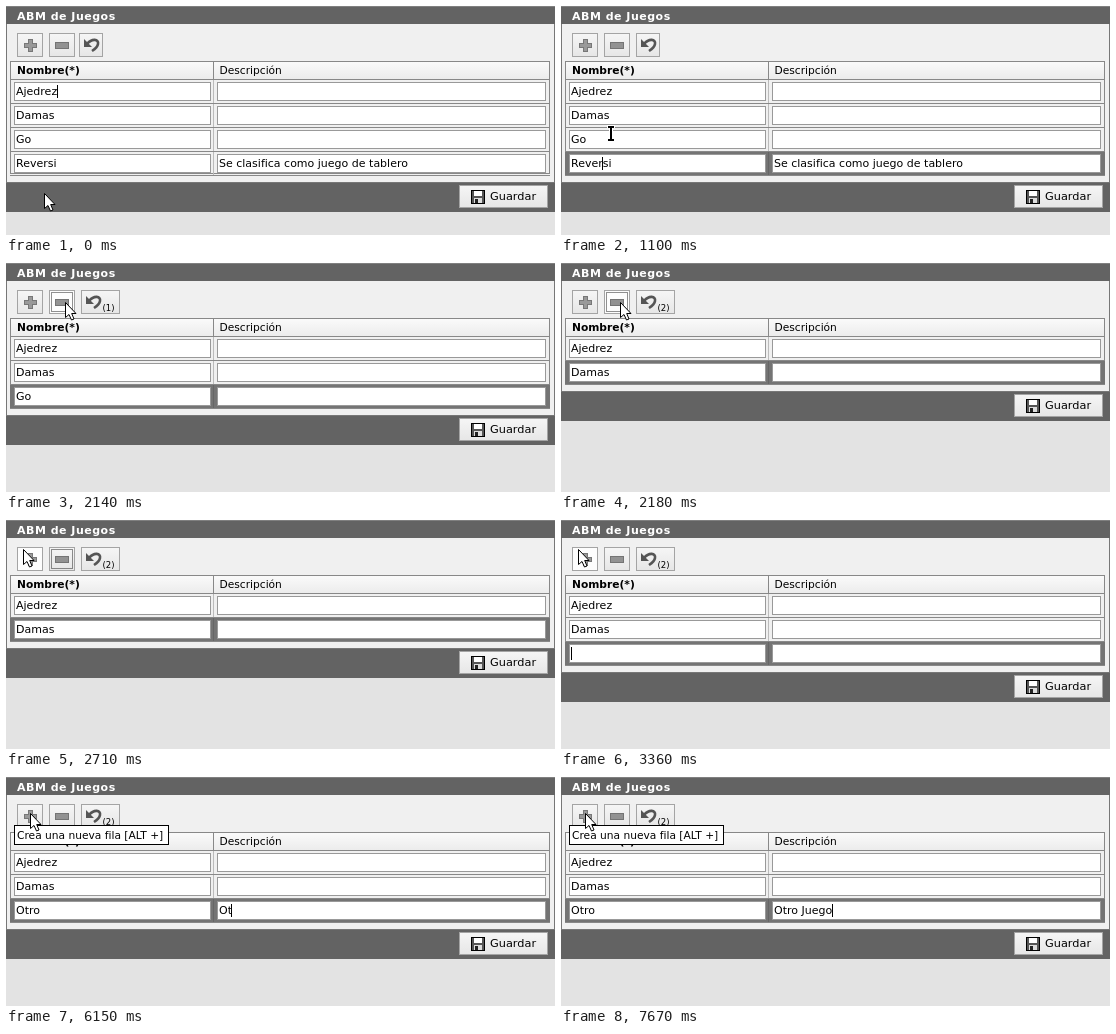
Write an HTML page with a canvas that moves like this. It is 549 by 229 pixels and loops after 8000 ms.

```html
<!DOCTYPE html>
<html lang="es">
<head>
<meta charset="utf-8">
<title>ABM de Juegos</title>
<style>
html, body { margin: 0; width: 100%; height: 100%; overflow: hidden; background: #e3e3e3; }
canvas { display: block; }
</style>
</head>
<body>
<canvas id="stage" width="549" height="229"></canvas>
<script>
const ctx = document.getElementById('stage').getContext('2d');
const LOOP = 8000;
const ROW = 24;
const FONT = '"DejaVu Sans", sans-serif';

const DELETE_1 = 1980, DELETE_2 = 2180, ADD_ROW = 3320, TOOLTIP = 3680, NEXT_FIELD = 5230;
const NAME_KEYS = [4200, 4600, 4680, 4850];
const TEXT_KEYS = [5750, 6100, 6190, 6280, 6720, 7200, 7420, 7500, 7590, 7670];

// Pointer path: time, x, y
const PATH = [
  [0, 39, 188], [50, 39, 188], [500, 43, 157], [900, 43, 157], [1100, 50, 127],
  [1540, 64, 41], [1700, 64, 41], [1740, 60, 40], [2590, 60, 40], [2710, 18, 30],
  [3520, 18, 30], [3680, 25, 37], [LOOP, 25, 37]
];

function pointerAt(t) {
  const i = PATH.findIndex(p => p[0] > t);
  const [t0, x0, y0] = PATH[i - 1], [t1, x1, y1] = PATH[i];
  const k = (t - t0) / (t1 - t0);
  return [Math.round(x0 + (x1 - x0) * k), Math.round(y0 + (y1 - y0) * k)];
}

const typed = (text, keys, t) => text.slice(0, keys.filter(k => k <= t).length);

function rect(x, y, w, h, color) {
  ctx.fillStyle = color;
  ctx.fillRect(x, y, w, h);
}

function box(x, y, w, h, fill, border) {
  rect(x, y, w, h, border);
  rect(x + 1, y + 1, w - 2, h - 2, fill);
}

function label(text, x, y, size = 11, color = '#000', weight = 'normal', spacing = 0) {
  ctx.font = `${weight} ${size}px ${FONT}`;
  ctx.letterSpacing = spacing + 'px';
  ctx.fillStyle = color;
  ctx.fillText(text, x, y);
}

function gradient(y, h, top, bottom) {
  const g = ctx.createLinearGradient(0, y, 0, y + h);
  g.addColorStop(0, top);
  g.addColorStop(1, bottom);
  return g;
}

function shape(points, x, y, fill, stroke) {
  ctx.beginPath();
  points.forEach(([px, py]) => ctx.lineTo(x + px, y + py));
  ctx.closePath();
  ctx.fillStyle = fill;
  ctx.fill();
  if (!stroke) return;
  ctx.strokeStyle = stroke;
  ctx.lineWidth = 1;
  ctx.stroke();
}

function button(x, y, w, h, hover) {
  box(x, y, w, h, hover ? '#fdfdfd' : gradient(y, h, '#f6f6f6', '#e6e6e6'), '#a4a4a4');
}

function field(x, y, w, text, caret) {
  box(x, y, w, 19, '#fff', '#999');
  label(text, x + 2, y + 13);
  if (caret === undefined) return;
  const cx = x + 2 + ctx.measureText(text.slice(0, caret)).width;
  rect(Math.floor(cx), y + 3, 1, 13, '#000');
}

function undoIcon(x, y) {
  ctx.strokeStyle = '#555';
  ctx.lineWidth = 2.6;
  ctx.beginPath();
  ctx.moveTo(x + 4, y + 6);
  ctx.bezierCurveTo(x + 9, y, x + 16, y + 1, x + 15, y + 6);
  ctx.bezierCurveTo(x + 14.5, y + 9, x + 12, y + 11, x + 9, y + 13);
  ctx.stroke();
  shape([[1, 1], [1, 9], [9, 9]], x, y, '#555');
}

function toolbar(t, px) {
  const overPlus = t >= 2710 && t < TOOLTIP;
  const overMinus = t >= 1500 && px > 43;
  button(11, 27, 26, 24, overPlus);
  rect(22, 33, 5, 13, '#777');
  rect(18, 37, 13, 5, '#777');
  rect(23, 34, 3, 11, '#999');
  rect(19, 38, 11, 3, '#999');

  button(43, 27, 26, 24, overMinus);
  box(49, 36, 14, 7, '#929292', '#747474');
  if (t >= 1940 && t < ADD_ROW) {
    ctx.strokeStyle = '#222';
    ctx.lineWidth = 1;
    ctx.setLineDash([1, 1]);
    ctx.strokeRect(45.5, 29.5, 21, 19);
    ctx.setLineDash([]);
  }

  const removed = t < DELETE_1 ? 0 : t < DELETE_2 ? 1 : 2;
  const x = t < 900 ? 73 : 75;
  button(x, 27, removed ? 39 : 24, 24);
  undoIcon(x + 4, 32);
  if (removed) label(`(${removed})`, 96.5, 48, 8.5);
}

function table(t) {
  const names = ['Ajedrez', 'Damas'];
  if (t < DELETE_2) names.push('Go');
  if (t < DELETE_1) names.push('Reversi');
  if (t >= ADD_ROW) names.push(typed('Otro', NAME_KEYS, t));
  const n = names.length;

  box(4, 55, 540, 17 + ROW * n, '#f0f0f0', '#888');
  rect(5, 56, 538, 17, gradient(56, 17, '#fafafa', '#ececec'));
  rect(4, 73, 540, 1, '#888');
  rect(207, 56, 1, 17, '#888');
  label('Nombre(*)', 11, 68, 10.67, '#000', 'bold');
  label('Descripción', 213.5, 68, 10.67);

  names.forEach((name, i) => {
    const y = 74 + ROW * i;
    const selected = t >= 900 && i === n - 1;
    if (selected) rect(4, y, 540, 23, '#747474');
    rect(4, y + 23, 540, 1, '#888');
    rect(207, y, 1, 23, selected ? '#666' : '#bbb');

    let caret, textCaret, text = '';
    if (name === 'Ajedrez' && t < 500) caret = 7;
    if (name === 'Reversi') {
      text = 'Se clasifica como juego de tablero';
      if (t >= 500 && t < 1740) caret = 5;
    }
    if (i === 2 && t >= ADD_ROW) {
      text = typed('Otro Juego', TEXT_KEYS, t);
      if (t < NEXT_FIELD) caret = name.length;
      else textCaret = text.length;
    }
    field(8, y + 2, 197, name, caret);
    field(211, y + 2, 329, text, textCaret);
  });
  return n;
}

function footer(y) {
  rect(0, y, 549, 30, '#636363');
  rect(0, y, 549, 1, '#777');
  button(453, y + 3, 89, 23);
  box(465, y + 8, 14, 14, '#555', '#000');
  rect(468, y + 9, 8, 5, '#fff');
  rect(468, y + 16, 8, 5, '#ddd');
  rect(469, y + 17, 3, 4, '#222');
  label('Guardar', 484, y + 18, 11.3);
}

function pointer(x, y) {
  if (y > 76 && y < 168) {
    for (const [color, g] of [['#fff', 1], ['#000', 0]]) {
      rect(x - 1 - g, y - 6 - g, 2 + 2 * g, 13 + 2 * g, color);
      rect(x - 3 - g, y - 7 - g, 6 + 2 * g, 2 + g, color);
      rect(x - 3 - g, y + 6, 6 + 2 * g, 2 + g, color);
    }
    return;
  }
  shape([[0, 0], [0, 15], [3.5, 12], [6, 17.5], [8.5, 16.5], [6.2, 11], [10.5, 11]],
    x - 0.5, y - 0.5, '#fff', '#000');
}

function draw(t) {
  const [px, py] = pointerAt(t);
  const rows = t < DELETE_1 ? 4 : t < DELETE_2 ? 3 : t < ADD_ROW ? 2 : 3;
  const bottom = 80 + ROW * rows;
  rect(0, 0, 549, 229, '#e3e3e3');
  box(0, 0, 549, bottom + 30, '#f0f0f0', '#777');
  rect(0, 0, 549, 18, '#636363');
  rect(0, 0, 549, 1, '#808080');
  label('ABM de Juegos', 11, 14, 11, '#fff', 'bold', 0.5);
  toolbar(t, px);
  table(t);
  footer(bottom);
  if (t >= TOOLTIP) {
    box(8, 48, 155, 20, '#fff', '#000');
    label('Crea una nueva fila [ALT +]', 11, 62, 10.67);
  }
  pointer(px, py);
}

const start = performance.now();
function tick() {
  draw((performance.now() - start) % LOOP);
  requestAnimationFrame(tick);
}
tick();
</script>
</body>
</html>
```
